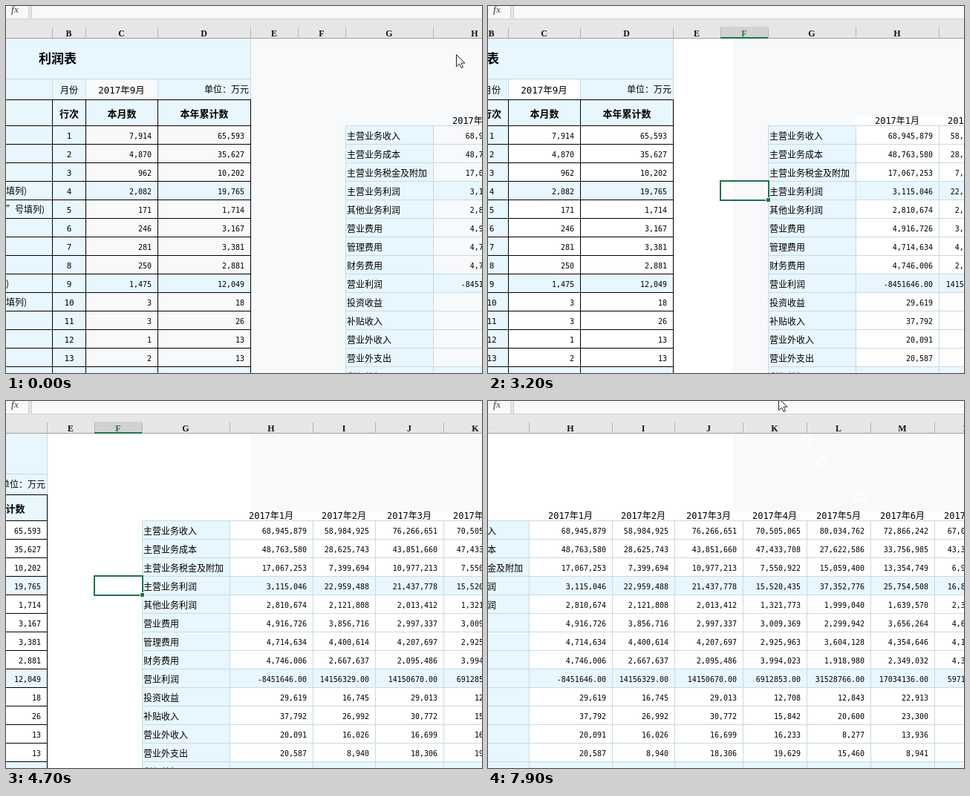
Animation of 641 by 495 pixels, one loop 8000 ms. Source, as an HTML page with a canvas:

```html
<!DOCTYPE html>
<html lang="zh">
<head>
<meta charset="utf-8">
<style>
  html, body { margin: 0; width: 100%; height: 100%; overflow: hidden; }
  canvas { display: block; }
</style>
</head>
<body>
<canvas id="stage" width="641" height="495"></canvas>
<script>
const W = 641, H = 495, LOOP = 8000, STEP = 100;
const ctx = document.getElementById('stage').getContext('2d');

const BLUE = '#e8f6fe', PALE = '#f8f9fb', LINE = '#c8dae4', GREEN = '#217346';
const CJK = '"Noto Sans CJK SC", "Noto Sans CJK", sans-serif';
const MONO = '"DejaVu Sans Mono", ' + CJK;
const NUM = '10px ' + MONO, LABEL = '12px ' + CJK, BOLD = 'bold 13px ' + CJK;
const SERIF = '12px "Liberation Serif", serif';

// Column edges in sheet coordinates: A to I, then J, then equal month columns
const edges = [-200, 62, 107, 204, 329, 393, 457, 575, 687, 771, 863];
while (edges.length < 15) edges.push(edges[edges.length - 1] + 86);
const [A, B, C, D, E, F, G, FIRST] = edges, RIGHT = edges[14];
const TOP = 161, ROW = 25, SUBTOTAL = 3, PROFIT = 8;
const rowY = i => TOP + ROW * i;
const isTotal = i => i === SUBTOTAL || i === PROFIT || i === 13;

const items = ('主营业务收入 主营业务成本 主营业务税金及附加 主营业务利润 其他业务利润 营业费用 管理费用 ' +
  '财务费用 营业利润 投资收益 补贴收入 营业外收入 营业外支出 利润总额').split(' ');

let seed = 2017;
const random = () => (seed = seed * 16807 % 2147483647) / 2147483647;

// January's entries; later months vary around them
const january = [68945879, 48763580, 17067253, 0, 2810674, 4916726, 4714634, 4746006, 0, 29619, 37792, 20091, 20587];

function withTotals(v) {
  v[SUBTOTAL] = v[0] - v[1] - v[2];
  v[PROFIT] = v[3] + v[4] - v[5] - v[6] - v[7];
  return v;
}

const months = Array.from({ length: 9 }, (_, m) => withTotals(january.map((v, i) => {
  const low = i ? 0.4 : 0.85, high = i ? 1 : 1.2;
  return m ? Math.round(v * (low + (high - low) * random())) : v;
})));
const tenThousands = v => Math.round(v / 1e4);
const thisMonth = months[8].map(tenThousands);
const thisYear = january.map((_, i) => tenThousands(months.reduce((sum, v) => sum + v[i], 0)));
const commas = v => v.toLocaleString('en-US');

// Key points: time, then one or two coordinates
const scrollKeys = [[2500, 0], [2600, 16], [2800, 16], [3200, 80], [3400, 124], [3600, 124],
  [3900, 189], [4000, 189], [4700, 274], [5800, 520]];
const selectPath = [[0, 606, 65], [300, 425, 250], [500, 410, 181], [900, 284, 170], [1000, 253, 170],
  [1100, 253, 170], [1200, 262, 190], [1400, 427, 313]];
const leavePath = [[7300, 602, 223], [7600, 450, 82], [7900, 391, -4]];
const SELECT_AT = 300;

function along(keys, t) {
  const n = keys.findIndex(k => k[0] > t);
  if (n < 0) return keys[keys.length - 1].slice(1);
  if (n === 0) return keys[0].slice(1);
  const a = keys[n - 1], b = keys[n], f = (t - a[0]) / (b[0] - a[0]);
  return a.slice(1).map((v, i) => Math.round(v + (b[i + 1] - v) * f));
}

function box(x, y, w, h, color) {
  ctx.fillStyle = color;
  ctx.fillRect(x, y, w, h);
}
const hline = (x1, x2, y, color) => box(x1, y, x2 - x1 + 1, 1, color);
const vline = (x, y1, y2, color) => box(x, y1, 1, y2 - y1 + 1, color);

function text(s, x, y, font, align = 'left', color = '#000') {
  ctx.font = font;
  ctx.textAlign = align;
  ctx.fillStyle = color;
  ctx.fillText(s, x, y);
}

function statement(paper) {
  box(A, 44, E - A, H, BLUE);
  box(C, 98, D - C, 28, paper);
  for (let i = 0; i < 13; i++) if (!isTotal(i)) box(C, rowY(i), E - C, ROW, paper);

  hline(A, E, 98, LINE);
  vline(E, 44, 126, LINE);
  for (const x of [B, C, D]) vline(x, 98, 126, LINE);
  hline(A, E, 126, '#000');
  for (let i = 0; i < 14; i++) hline(A, E, rowY(i), '#000');
  for (const x of [B, C, D, E]) vline(x, 126, H, '#000');

  text('利润表', 69.5, 77, 'bold 17px ' + CJK, 'center');
  text('月份', 85, 118, LABEL, 'center');
  text('2017年9月', 155.5, 118, '12.5px ' + MONO, 'center');
  text('单位：万元', 327, 117, LABEL, 'right');
  text('行次', 85, 150, BOLD, 'center');
  text('本月数', 156, 150, BOLD, 'center');
  text('本年累计数', 267, 150, BOLD, 'center');

  thisMonth.forEach((v, i) => {
    const y = rowY(i) + 18;
    text(i + 1, 85, y, '11px ' + MONO, 'center');
    text(commas(v), D - 8, y, NUM, 'right');
    text(commas(thisYear[i]), E - 8, y, NUM, 'right');
  });
  [[3, '填列)'], [4, '”号填列)'], [8, ')'], [9, '填列)']]
    .forEach(([i, s]) => text(s, 0, rowY(i) + 18, LABEL));
}

function monthTable(paper) {
  box(FIRST, 149, RIGHT - FIRST, H, paper);
  box(G, TOP, FIRST - G, H, BLUE);
  items.forEach((name, i) => {
    if (isTotal(i)) box(G, rowY(i), RIGHT - G, ROW, BLUE);
    hline(G, RIGHT, rowY(i), LINE);
    text(name, G + 2, rowY(i) + 18.5, LABEL);
  });
  edges.slice(6).forEach(x => vline(x, TOP, H, LINE));
  months.slice(0, 7).forEach((values, m) => {
    const end = edges[m + 8];
    text(`2017年${m + 1}月`, (edges[m + 7] + end) / 2, 159, '12px ' + MONO, 'center');
    values.forEach((v, i) =>
      text(i === PROFIT ? v.toFixed(2) : commas(v), end - 8, rowY(i) + 18, NUM, 'right'));
  });
}

function selection() {
  ctx.strokeStyle = GREEN;
  ctx.lineWidth = 2;
  ctx.strokeRect(F, 236, 65, 26);
  box(F + 61, 258, 7, 7, '#fff');
  box(F + 62, 259, 5, 5, GREEN);
}

function headers(t) {
  for (let c = 0; c < 14; c++) {
    const x = edges[c], w = edges[c + 1] - x;
    const chosen = c === 5 && t >= SELECT_AT;
    const hover = c === 10 && t >= 7800 && t < 7900;
    if (chosen || hover) box(x, 28, w, 15, chosen ? '#d2d2d2' : '#9fd5b7');
    vline(x, 29, 43, '#b4b4b4');
    text('ABCDEFGHIJKLMN'[c], x + w / 2, 41, 'bold ' + SERIF, 'center', chosen ? GREEN : '#111');
    if (chosen) box(x, 42, w + 1, 2, GREEN);
  }
}

function toolbar() {
  box(0, 0, W, 43, '#e6e6e6');
  hline(0, W, 43, '#a0a0a0');
  for (const [x, end] of [[-1, 30], [34, W]]) {
    box(x, 0, end - x, 17, PALE);
    hline(x, end, 17, '#cfcfcf');
    vline(x, 0, 17, '#cfcfcf');
    vline(end, 0, 17, '#cfcfcf');
  }
  text('fx', 7, 9, 'italic bold ' + SERIF, 'left', '#666');
}

function polygon(x, y, pts, fill, stroke) {
  ctx.beginPath();
  pts.forEach(([px, py]) => ctx.lineTo(x + px, y + py));
  ctx.closePath();
  ctx.fillStyle = fill;
  ctx.strokeStyle = stroke;
  ctx.fill();
  ctx.stroke();
}

const arrow = [[.5, .5], [.5, 16.5], [4.5, 13], [7, 18.5], [9.5, 17.5], [7, 12], [12, 12]];
const down = [[-1, -7], [1, -7], [1, 2], [4, 2], [0, 7], [-4, 2], [-1, 2]];
// One arm of the plus, turned four times
const cross = [0, 1, 2, 3].flatMap(q => [[-2.5, -2.5], [-2.5, -7], [2.5, -7]].map(([x, y]) => {
  for (let i = 0; i < q; i++) [x, y] = [-y, x];
  return [x, y];
}));

// Faint white crosses stay behind on the paper
function trail(path, from, t) {
  ctx.lineWidth = 2;
  for (let at = from; at <= t; at += STEP) {
    const [x, y] = along(path, at);
    if (y > 44) polygon(x, y, cross, PALE, '#fff');
  }
}

function pointer(t, scroll) {
  if (!scroll) trail(selectPath, 400, Math.min(t, 1400));
  if (t >= 7500) trail(leavePath, 7500, t);
  if (t >= 1400 && t < 7300) return;

  const [x, y] = along(t < 7300 ? selectPath : leavePath, t);
  ctx.lineWidth = 1;
  if (t === 0 || y < 28) polygon(x, y, arrow, '#fff', '#222');
  else if (y < 44) polygon(x, y, down, '#000', '#000');
  else polygon(x, y, cross, '#fff', '#333');
}

function scrolled(scroll, paint) {
  ctx.save();
  ctx.translate(-scroll, 0);
  paint();
  ctx.restore();
}

function draw(t) {
  const [scroll] = along(scrollKeys, t), paper = scroll ? '#fff' : PALE;
  box(0, 0, W, H, paper);
  box(330, 44, W, H, PALE);
  scrolled(scroll, () => {
    statement(paper);
    monthTable(paper);
    if (t >= SELECT_AT) selection();
  });
  toolbar();
  scrolled(scroll, () => headers(t));
  pointer(t, scroll);
}

function tick() {
  const t = performance.now() % LOOP;
  draw(t - t % STEP);
  requestAnimationFrame(tick);
}
tick();
</script>
</body>
</html>
```
